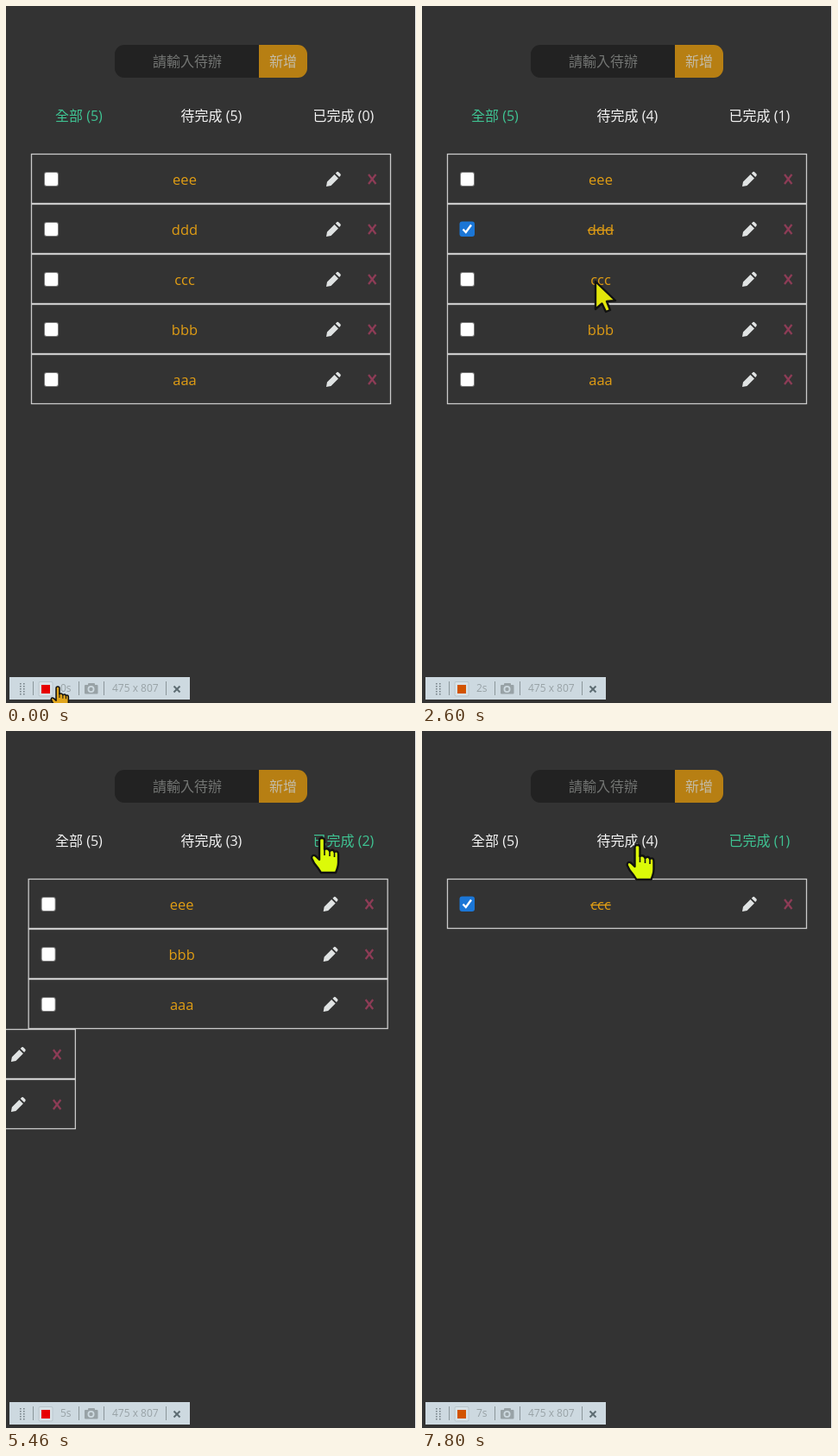
These frames come from a looping animation (475 px wide and 807 px high, 8 s). An HTML page with a canvas:

```html
<!DOCTYPE html>
<html lang="zh-Hant">
<meta charset="utf-8">
<title>待辦清單</title>
<style>
  html, body { margin: 0; width: 100%; height: 100%; overflow: hidden; background: #333; }
  canvas { display: block; }
</style>
<canvas id="stage" width="475" height="807"></canvas>
<script>
const ctx = document.getElementById('stage').getContext('2d');
const LOOP = 8000, SLIDE = 500, ROW_W = 417, ROW_H = 58;
const FONT = '"Open Sans", "Noto Sans CJK TC", "Noto Sans CJK JP", "Noto Sans CJK", sans-serif';
const GREEN = '#3fc493', ORANGE = '#e09d14', RED = '#8d3c56';

const items = ['eee', 'ddd', 'ccc', 'bbb', 'aaa'];
const clicks = [
  { at: 1850, toggle: 'ddd' },
  { at: 2680, toggle: 'ccc' },
  { at: 3775, tab: 1 },
  { at: 5402, tab: 2 },
  { at: 6850, toggle: 'ddd' },
];
// time, x, y of the pointer's hot spot
const pointerPath = [
  [0, 60, 788], [130, 60, 788], [1100, 205, 262], [2050, 205, 262],
  [2340, 201, 319], [2990, 201, 319], [3700, 249.5, 121], [4620, 249.5, 121],
  [5200, 366, 124], [6240, 366, 124], [6370, 351.5, 131], [6740, 208, 204],
  [7220, 208, 204], [7750, 249.5, 132], [LOOP, 249.5, 132],
];
const tabs = [['全部', 57], ['待完成', 202.5], ['已完成', 355.5]];

const pencil = new Path2D('M-8 8.5L-7 3L1.5-5.5L6-1L-2.5 7.5Z M2.8-6.8L4.5-8.5Q5.5-9 6.5-8L8.5-6Q9.2-5 8.5-4L7.2-2.4Z');
const arrow = new Path2D('M0 0V32L7.5 25.5L12 35L17 33L13 23L23 22Z');
const hand = new Path2D('M-3 3Q-3 0 0 0Q3 0 3 3V13Q7 11 9 15Q13 12 14.5 16Q19 14 19 19V28Q19 33 16 40H-1Q-4 35-9 29L-12 23Q-11 18-7 21L-3 25Z');
const knuckles = new Path2D('M3 12V20M9 15V21M14.5 16V22');

// CSS "ease": cubic-bezier(.25, .1, .25, 1)
function ease(x) {
  const bezier = (a, b, s) => 3 * a * s * (1 - s) ** 2 + 3 * b * s * s * (1 - s) + s ** 3;
  let lo = 0, hi = 1;
  for (let i = 0; i < 20; i++) {
    const mid = (lo + hi) / 2;
    if (bezier(.25, .25, mid) < x) lo = mid; else hi = mid;
  }
  return bezier(.1, 1, lo);
}

function text(str, x, y, color, size = 16, weight = 400, align = 'left') {
  ctx.font = `${weight} ${size}px ${FONT}`;
  ctx.textAlign = align;
  ctx.fillStyle = color;
  ctx.fillText(str, x, y);
}

function box(x, y, w, h, color, radius = 0) {
  ctx.fillStyle = color;
  ctx.beginPath();
  ctx.roundRect(x, y, w, h, radius);
  ctx.fill();
}

function line(color, width, ...points) {
  ctx.strokeStyle = color;
  ctx.lineWidth = width;
  ctx.beginPath();
  points.forEach(([x, y]) => ctx.lineTo(x, y));
  ctx.stroke();
}

function cross(color, width, x, y, w, h) {
  line(color, width, [x, y], [x + w, y + h]);
  line(color, width, [x + w, y], [x, y + h]);
}

function stateAt(t) {
  const done = new Set();
  const rows = items.map(name => ({ name, shown: true, since: -Infinity }));
  let tab = 0;
  for (const click of clicks.filter(c => c.at <= t)) {
    if (click.toggle) {
      if (!done.delete(click.toggle)) done.add(click.toggle);
    } else tab = click.tab;
    for (const row of rows) {
      const shown = tab === 0 || done.has(row.name) === (tab === 2);
      if (shown !== row.shown) Object.assign(row, { shown, since: click.at });
    }
  }
  for (const row of rows) {
    const p = Math.min(1, (t - row.since) / SLIDE);
    row.entering = row.shown && p < 1;
    row.present = row.shown || p < 1;
    // leaving plays the entrance in reverse
    row.shift = -ROW_W * (1 - ease(row.shown ? p : 1 - p));
    row.done = done.has(row.name);
  }
  const visible = rows.filter(r => r.present).sort((a, b) => a.entering - b.entering);
  return { tab, visible, doneCount: done.size };
}

function drawHeader({ tab, doneCount }) {
  box(126, 45, 167, 38, '#222', [11, 0, 0, 11]);
  box(293, 45, 56, 38, '#b77f13', [0, 11, 11, 0]);
  text('請輸入待辦', 170, 70, '#737573');
  text('新增', 305, 70, '#c3bca8', 16, 500);
  const counts = [items.length, items.length - doneCount, doneCount];
  tabs.forEach(([label, x], i) =>
    text(`${label} (${counts[i]})`, x, 133, i === tab ? GREEN : '#f4f4f4'));
}

function drawRow(row, index) {
  ctx.save();
  ctx.translate(29 + row.shift, 171 + index * ROW_H);
  ctx.strokeStyle = '#cacaca';
  ctx.lineWidth = 1.3;
  ctx.strokeRect(.5, .5, ROW_W - 1, ROW_H - 1);
  if (row.done) {
    box(14.5, 20.5, 17.5, 17.5, '#1b76d6', 3);
    line('#fff', 2.4, [18.5, 29.5], [21.8, 33], [28, 24.5]);
  } else {
    box(15, 21, 17, 17, '#777', 3);
    box(16, 22, 15, 15, '#fff', 2);
  }
  text(row.name, 178, 35.5, ORANGE, 16.5, 500, 'center');
  if (row.done) {
    const half = ctx.measureText(row.name).width / 2;
    line(ORANGE, 1.4, [178 - half, 30.5], [178 + half, 30.5]);
  }
  cross(RED, 2.3, 391, 24, 8.5, 11);
  ctx.translate(350, 29.5);
  ctx.fillStyle = '#e0e3e3';
  ctx.fill(pencil);
  ctx.restore();
}

function drawRecorder(t) {
  const paper = '#cdd9e0', grey = '#98a2a6', phase = t % 1000;
  box(4, 777, 209, 26, paper);
  for (let y = 784; y < 798; y += 3)
    for (const x of [16, 20]) box(x, y, 1.6, 1.6, '#768187');
  for (const x of [31.5, 84.5, 113.5, 185.5]) line('#8b969a', 1, [x, 782], [x, 798]);
  box(37.5, 782, 17, 17.5, '#b9c6cd', 2);
  box(38.5, 783, 15, 15.5, '#d8e2e7', 1);
  box(41, 786, 10, 10, phase > 580 && phase < 850 ? '#d25300' : '#e60000');
  text(`${Math.floor(t / 1000)}s`, 63, 794, grey, 12);
  box(91, 786, 15.5, 10.5, grey, 1);
  box(95, 784, 8, 4, grey, 1);
  box(94.5, 787, 8, 8, paper, 4);
  box(96.3, 788.8, 4.4, 4.4, grey, 2.2);
  text('475 x 807', 123, 794, grey, 12);
  cross('#5d6c72', 2, 194.5, 787.5, 7, 7);
}

function drawPointer(t) {
  const next = pointerPath.findIndex(p => p[0] > t);
  const [t0, x0, y0] = pointerPath[next - 1], [t1, x1, y1] = pointerPath[next];
  const p = (t - t0) / (t1 - t0), k = p * p * (3 - 2 * p);
  const x = x0 + (x1 - x0) * k, y = y0 + (y1 - y0) * k;
  const overTab = y > 111 && y < 145 &&
    [[57, 113], [203, 273], [355, 426]].some(([a, b]) => x >= a && x <= b);
  const isHand = overTab || y > 777, pressed = t < 130;
  ctx.save();
  ctx.translate(x, y);
  if (pressed) ctx.scale(.65, .65);
  ctx.lineJoin = 'round';
  ctx.lineWidth = 2.4;
  ctx.strokeStyle = '#111';
  ctx.fillStyle = pressed ? '#e0a51c' : isHand ? '#dcfa08' : '#e2e60a';
  ctx.fill(isHand ? hand : arrow);
  ctx.stroke(isHand ? hand : arrow);
  ctx.lineWidth = 1.6;
  if (isHand) ctx.stroke(knuckles);
  ctx.restore();
}

function draw() {
  const t = performance.now() % LOOP;
  const state = stateAt(t);
  box(0, 0, 474, 807, '#333');
  box(474, 0, 1, 807, '#f0f0f0');
  drawHeader(state);
  state.visible.forEach(drawRow);
  drawRecorder(t);
  drawPointer(t);
  requestAnimationFrame(draw);
}
draw();
</script>
</html>
```
